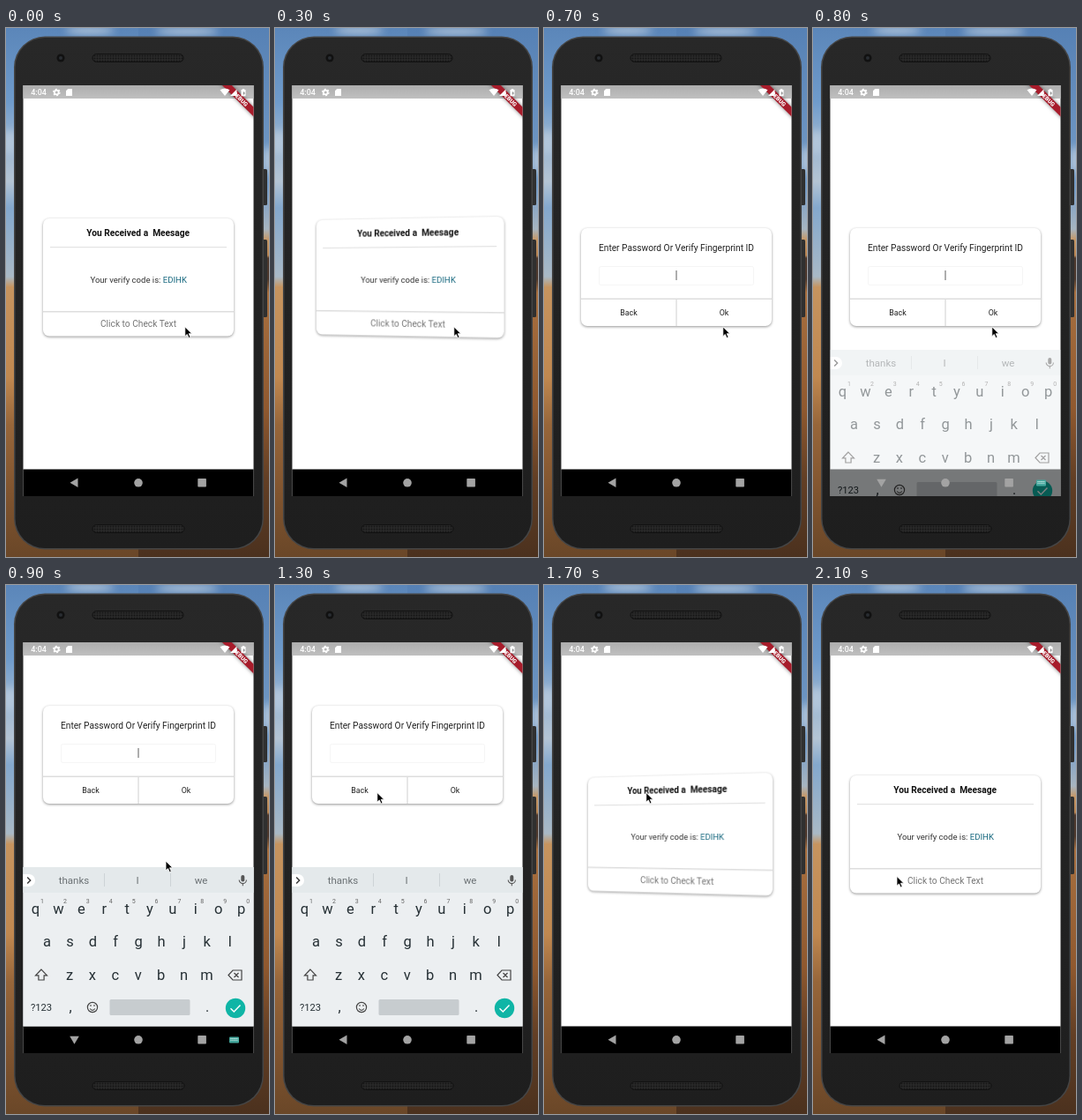
Animation, 298 px wide and 600 px high, one loop 2200 ms. Source, as an HTML page:

```html
<!DOCTYPE html>
<html lang="en">
<head>
<meta charset="utf-8">
<title>Flip card on a phone</title>
<style>
html, body { margin: 0; width: 100%; height: 100%; overflow: hidden; }
#stage { position: relative; width: 298px; height: 600px; overflow: hidden; }
svg, #deck { position: absolute; left: 0; top: 0; width: 298px; height: 600px; }
#deck { perspective: 650px; perspective-origin: 150px 283px; }
.card { transform-origin: 150px 283px; }
.sheet { fill: #fff; filter: drop-shadow(0 1.5px 1.5px rgba(0,0,0,.42)); }
.rule { stroke: #ddd; fill: none; }
.soft { filter: blur(4px); }
text { font-family: Roboto, Arial, sans-serif; text-anchor: middle; fill: #212121; white-space: pre; }
</style>
</head>
<body>
<div id="stage">
<svg viewBox="0 0 298 600">
  <defs>
    <linearGradient id="west" x2="0" y2="1">
      <stop offset="0" stop-color="#5b86b9"/><stop offset=".14" stop-color="#6f9bcb"/>
      <stop offset=".2" stop-color="#94b1d0"/><stop offset=".29" stop-color="#b4c4d4"/>
      <stop offset=".34" stop-color="#84a8cd"/><stop offset=".47" stop-color="#a9b9c6"/>
      <stop offset=".49" stop-color="#c6945f"/><stop offset=".66" stop-color="#c08850"/>
      <stop offset=".75" stop-color="#97663a"/><stop offset=".88" stop-color="#80542f"/>
      <stop offset="1" stop-color="#6a4728"/>
    </linearGradient>
    <linearGradient id="east" x2="0" y2="1">
      <stop offset="0" stop-color="#5681b5"/><stop offset=".3" stop-color="#759cc7"/>
      <stop offset=".38" stop-color="#a7b5c1"/><stop offset=".4" stop-color="#c59868"/>
      <stop offset=".43" stop-color="#b98553"/><stop offset=".435" stop-color="#4c382c"/>
      <stop offset=".475" stop-color="#4c382c"/><stop offset=".5" stop-color="#a87040"/>
      <stop offset=".72" stop-color="#90592f"/><stop offset=".85" stop-color="#633f25"/>
      <stop offset="1" stop-color="#4b311e"/>
    </linearGradient>
    <linearGradient id="status" x2="0" y2="1">
      <stop offset="0" stop-color="#aeaeae"/><stop offset="1" stop-color="#bfbfbf"/>
    </linearGradient>
    <linearGradient id="body" x2="0" y2="1">
      <stop offset="0" stop-color="#282828"/><stop offset="1" stop-color="#1e1e1e"/>
    </linearGradient>
    <pattern id="mesh" width="3" height="3" patternUnits="userSpaceOnUse">
      <rect width="3" height="3" fill="#292929"/><circle cx="1.5" cy="1.5" r="1" fill="#151515"/>
    </pattern>
    <clipPath id="screen"><rect x="19.5" y="65" width="261" height="466"/></clipPath>
  </defs>
  <rect width="150" height="600" fill="url(#west)"/>
  <rect x="150" width="148" height="600" fill="url(#east)"/>
  <g class="soft" fill="#b3c6da">
    <ellipse cx="95" cy="3" rx="28" ry="4"/><ellipse cx="205" cy="4" rx="36" ry="4"/>
    <ellipse cx="4" cy="130" rx="9" ry="14"/><ellipse cx="297" cy="150" rx="6" ry="16"/>
  </g>
  <rect x="290" y="160" width="6" height="41" rx="1.5" fill="#303030"/>
  <rect x="290" y="240" width="6" height="88" rx="1.5" fill="#303030"/>
  <rect x="9" y="9.5" width="283" height="582" rx="35" fill="#454545"/>
  <rect x="10.5" y="11" width="280" height="579" rx="33.5" fill="url(#body)"/>
  <rect x="98" y="29.5" width="103" height="9" rx="4.5" fill="url(#mesh)" stroke="#111"/>
  <rect x="98" y="563.5" width="104" height="9" rx="4.5" fill="url(#mesh)" stroke="#111"/>
  <circle cx="62" cy="34" r="4.5" fill="#111"/><circle cx="62" cy="34" r="2" fill="#292d32"/>
  <g clip-path="url(#screen)">
    <rect x="19" y="65" width="262" height="466" fill="#fff"/>
    <rect x="19" y="65" width="262" height="15" fill="url(#status)"/>
    <path d="M241 61h10.8l35 35v10.8z" fill="#a71c2b" style="filter:drop-shadow(0 0 2px rgba(0,0,0,.5))"/>
    <g fill="#fff">
      <text x="37" y="76.2" font-size="9" font-weight="500" style="fill:#fff">4:04</text>
      <circle cx="57.3" cy="73" r="2.4" fill="none" stroke="#fff" stroke-width="1.8"/>
      <circle cx="57.3" cy="73" r="3.7" fill="none" stroke="#fff" stroke-width="1.2" stroke-dasharray="1.95 1.92"/>
      <path d="M70.3 69h4.7v8h-7v-5.7z"/>
      <path d="M242.5 70.2q5.5-3.6 11 0l-5.5 6.8z"/>
      <path d="M254 77l7.5-7.5v7.5z"/>
      <path d="M266.5 70h1.3v-1h2.4v1h1.3v7.2h-5z"/>
      <text x="0" y="2.4" transform="translate(265.7 80.3) rotate(45)" font-size="6.5" font-weight="900" style="fill:#fff">DEBUG</text>
    </g>
    <path d="M268.3 74.5l1.7-3v2h1l-1.7 3v-2z" fill="#888"/>
  </g>
</svg>

<div id="deck">
  <svg class="card" id="front" viewBox="0 0 298 600">
    <rect class="sheet" x="42" y="216" width="216" height="133.5" rx="7"/>
    <text x="149.7" y="236.2" font-size="10.2" font-weight="700" style="fill:#111">You Received a  Meesage</text>
    <path class="rule" d="M50 248.7h200"/>
    <text x="150.2" y="289" font-size="9.55" style="fill:#333">Your verify code is: <tspan fill="#17687f">EDIHK</tspan></text>
    <path class="rule" d="M42 321.7h216" stroke-width="1.4"/>
    <text x="150" y="339.4" font-size="10.2" style="fill:#757575">Click to Check Text</text>
  </svg>
  <svg class="card" id="back" viewBox="0 0 298 600">
    <rect class="sheet" x="42" y="227" width="216" height="111" rx="7"/>
    <g id="form">
      <text x="150" y="252.5" font-size="10.2">Enter Password Or Verify Fingerprint ID</text>
      <rect x="62.5" y="270.5" width="175" height="21" rx="2" fill="none" stroke="#f5f5f5"/>
      <path id="caret" d="M150 275v11" stroke="#777" stroke-width="1.2"/>
      <path class="rule" d="M42 307.2h216M150 307v31" stroke-width="1.4"/>
      <text x="96" y="326" font-size="8.9">Back</text>
      <text x="204" y="326" font-size="8.9">Ok</text>
    </g>
  </svg>
</div>

<svg viewBox="0 0 298 600">
  <g clip-path="url(#screen)">
    <rect x="19" y="500.5" width="262" height="31"/>
    <g id="keyboard">
      <rect x="19" y="320" width="262" height="180.5" fill="#eceff1"/>
      <rect x="19" y="320" width="262" height="29" fill="#e4e9eb"/>
      <path d="M111.5 327v15M186.5 327v15" stroke="#cdd3d6"/>
      <path d="M19 328h7a7 7 0 0 1 0 14h-7z" fill="#fff"/>
      <path d="M24.2 331.5l3.5 3.5-3.5 3.5" fill="none" stroke="#333" stroke-width="1.4"/>
      <rect x="266.3" y="329" width="4" height="7.5" rx="2" fill="#555"/>
      <path d="M264.2 334.5a4.1 4.1 0 0 0 8.2 0M268.3 338.5v2.8" fill="none" stroke="#555" stroke-width="1.1"/>
      <g id="keys"></g>
      <path d="M40 436l-6.5 6.8h3.4v5.2h6.2v-5.2h3.4zM252 442.5l5-5.5h10v11h-10zM258.5 440l5 5m0-5l-5 5" fill="none" stroke="#444" stroke-width="1.2"/>
      <circle cx="98" cy="479" r="5.6" fill="none" stroke="#444" stroke-width="1.2"/>
      <path d="M95.2 480.5q2.8 3.6 5.6 0" fill="none" stroke="#444" stroke-width="1.2"/>
      <path d="M96 476.2v1.6M100 476.2v1.6" stroke="#444" stroke-width="1.4"/>
      <rect x="117.5" y="470" width="91" height="18" rx="1.5" fill="#c7cccf"/>
      <circle cx="260" cy="480" r="11.2" fill="#0fb5a6"/>
      <path d="M254.5 480.2l3.8 3.8 7.2-7.5" fill="none" stroke="#fff" stroke-width="1.4"/>
    </g>
  </g>
  <g fill="#a3a3a3">
    <path id="arrow" d="M72.5 515.8l9-5.3v10.6z"/>
    <circle cx="150" cy="515.8" r="4.8"/>
    <rect x="217.3" y="511" width="9.6" height="9.6" rx=".8"/>
  </g>
  <g id="switcher">
    <rect x="253" y="512.5" width="11" height="7" rx="1" fill="#45a79d"/>
    <path d="M254.5 514.5h8M254.5 516.3h8" stroke="#fff" stroke-width=".9" stroke-dasharray="1 .8"/>
  </g>
  <path id="pointer" d="M0 0v10.7l2.5-2.3 1.8 4.1 1.9-.8-1.8-4h3.4z" fill="#000" stroke="#fff" stroke-width=".8"/>
</svg>
</div>
<script>
const $ = id => document.getElementById(id);
const clamp = v => Math.max(0, Math.min(1, v));
const ramp = (t, a, b) => clamp((t - a) / (b - a));
const mix = (a, b, k) => a + (b - a) * k;
const show = (id, on) => $(id).style.visibility = on ? 'visible' : 'hidden';

const label = (s, x, y, size, color = '#263035') =>
  `<text x="${x}" y="${y}" font-size="${size}" style="fill:${color}">${s}</text>`;
const row = (letters, x, y) => [...letters].map((c, i) => label(c, x + i * 25.9, y, 16.5)).join('');

$('keys').innerHTML =
  row('qwertyuiop', 33.5, 373) + row('asdfghjkl', 46.5, 410) + row('zxcvbnm', 72, 447.5) +
  [...'1234567890'].map((c, i) => label(c, 41 + i * 25.9, 360.5, 7, '#666')).join('') +
  ['thanks', 'I', 'we'].map((s, i) => label(s, 77 + i * 72, 339, 11.5, '#6b7174')).join('') +
  label('?123', 40, 483, 11.2) + label(',', 73, 483.5, 16) + label('.', 228, 483.5, 16);

function pointerAt(t) {
  const a = ramp(t, 800, 1200), b = ramp(t, 1800, 2100);
  return [mix(mix(202.8, 115.8, a), 95, b), mix(mix(339, 235.5, a), 330.5, b)];
}

function draw(t) {
  // Flip runs 0 to 180 degrees; the visible face swaps at 90.
  const flip = t < 1300 ? 180 * ramp(t, 277, 677) : 180 * (1 - ramp(t, 1388, 1728));
  const isBack = flip >= 90;
  const lift = t >= 900 && t < 1400 ? -90 : 0;
  show('front', !isBack);
  show('back', isBack);
  $('front').style.transform = `rotateY(${-flip}deg)`;
  $('back').style.transform = `translateY(${lift}px) rotateY(${180 - flip}deg)`;
  $('form').style.opacity = flip > 105 ? 1 : 0;
  $('caret').style.opacity = t >= 700 && t < 1200 ? 1 : 0;

  const up = t < 1300 ? ramp(t, 700, 900) : 1 - ramp(t, 1300, 1500);
  $('keyboard').setAttribute('transform', `translate(0 ${90 * (1 - up)})`);
  $('keyboard').style.opacity = up;

  const typing = t >= 800 && t < 1300;
  $('arrow').setAttribute('transform', typing ? 'rotate(-90 77.5 515.8)' : '');
  show('switcher', typing);
  $('pointer').setAttribute('transform', `translate(${pointerAt(t)})`);
}

const start = performance.now();
function tick() {
  const t = (performance.now() - start) % 2200;
  draw(Math.floor(t / 100) * 100); // ten poses a second
  requestAnimationFrame(tick);
}
tick();
</script>
</body>
</html>
```
